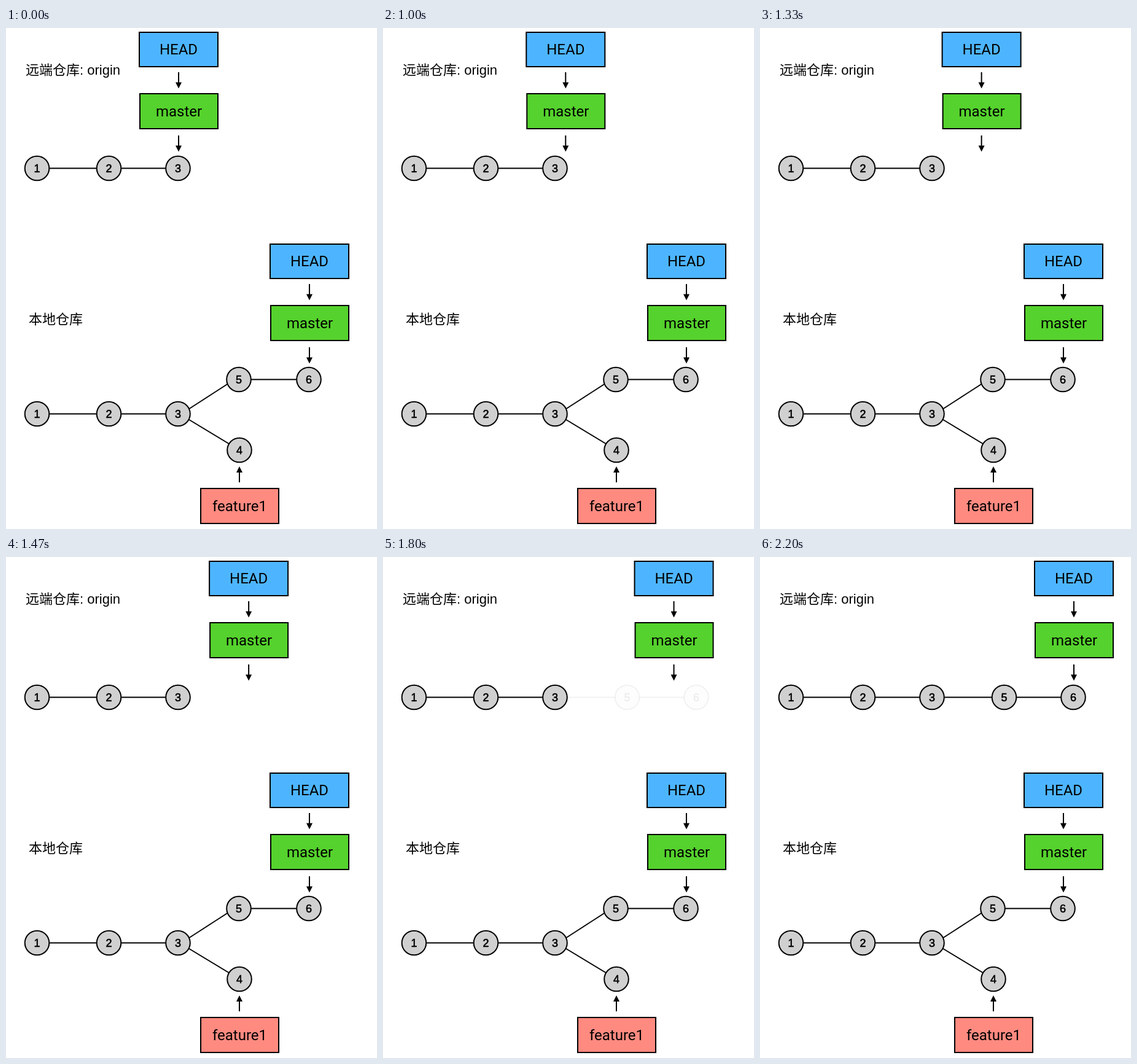
Animation of 604x816 px, one loop 3600 ms. Source, as an HTML page with a canvas:

```html
<!DOCTYPE html>
<html lang="zh-CN">
<head>
<meta charset="utf-8">
<title>Push</title>
<style>
html, body { margin: 0; width: 100%; height: 100%; overflow: hidden; background: #fff; }
canvas { display: block; width: 604px; height: 816px; }
</style>
</head>
<body>
<canvas id="stage" width="604" height="816"></canvas>
<script>
const ctx = document.getElementById('stage').getContext('2d');
const LOOP = 3600;
const TICK = 1000 / 15;
const BLUE = '#4db5ff', GREEN = '#55d22d', RED = '#ff8a80', GRAY = '#d0d0d0';
const LABEL = '24px Roboto, sans-serif';
const TITLE = '22px "Liberation Sans", "Noto Sans CJK SC", "Noto Sans CJK", sans-serif';
const DIGIT = '18px "Liberation Sans", Arial, sans-serif';

// Ease-in-out as cubic-bezier(.42, 0, .58, 1), solved by bisection
function ease(u) {
  if (u <= 0) return 0;
  if (u >= 1) return 1;
  let lo = 0, hi = 1;
  for (let i = 0; i < 24; i++) {
    const s = (lo + hi) / 2, r = 1 - s;
    const x = 3 * r * r * s * 0.42 + 3 * r * s * s * 0.58 + s * s * s;
    if (x < u) lo = s; else hi = s;
  }
  return lo * lo * (3 - 2 * lo);
}

function line(x1, y1, x2, y2) {
  ctx.beginPath();
  ctx.moveTo(x1, y1);
  ctx.lineTo(x2, y2);
  ctx.stroke();
}

function text(str, x, y, font, align = 'center') {
  ctx.font = font;
  ctx.textAlign = align;
  ctx.fillStyle = '#000';
  ctx.fillText(str, x, y);
}

function box(str, x, y, w, h, color) {
  ctx.fillStyle = color;
  ctx.fillRect(x, y, w, h);
  ctx.strokeRect(x, y, w, h);
  text(str, x + w / 2, y + h / 2 + 8.3, LABEL);
}

function arrow(x, from, to) {
  const d = Math.sign(to - from);
  line(x, from, x, to - 8 * d);
  ctx.fillStyle = '#000';
  ctx.beginPath();
  ctx.moveTo(x, to);
  ctx.lineTo(x - 5, to - 10 * d);
  ctx.lineTo(x + 5, to - 10 * d);
  ctx.fill();
}

function node(n, x, y) {
  ctx.beginPath();
  ctx.arc(x, y, 19.8, 0, Math.PI * 2);
  ctx.fillStyle = GRAY;
  ctx.fill();
  ctx.stroke();
  text(n, x, y + 6.5, DIGIT);
  ctx.lineWidth = 0.6;
  ctx.strokeText(n, x, y + 6.5);
  ctx.lineWidth = 2;
}

function pointer(x, y) {
  ctx.save();
  ctx.translate(x, y);
  box('HEAD', 217, 7, 128, 56, BLUE);
  arrow(281, 72, 98.5);
  box('master', 218, 107, 127, 57, GREEN);
  arrow(281, 175, 201.5);
  ctx.restore();
}

function trunk(y) {
  line(50.5, y, 280, y);
  node('1', 50.5, y);
  node('2', 167.5, y);
  node('3', 280, y);
}

function remote(shift, alpha) {
  text('远端仓库: origin', 32, 75.5, TITLE, 'left');
  trunk(228.5);
  ctx.globalAlpha = alpha;
  line(300.5, 228.5, 378, 228.5);
  line(417.5, 228.5, 490, 228.5);
  node('5', 397.5, 228.5);
  node('6', 510, 228.5);
  ctx.globalAlpha = 1;
  pointer(shift, 0);
}

function local() {
  text('本地仓库', 37, 481.5, TITLE, 'left');
  line(280, 632, 379, 568);
  line(280, 627, 380, 687.5);
  line(379, 572.5, 493, 572.5);
  trunk(628.5);
  node('5', 379, 572.5);
  node('6', 493, 572.5);
  node('4', 380, 687.5);
  pointer(213, 345);
  arrow(380, 740, 714);
  box('feature1', 317, 750, 127, 57, RED);
}

function draw(now) {
  const t = Math.floor((now % LOOP + 4) / TICK) * TICK;
  const done = t > 2190;
  ctx.fillStyle = '#fff';
  ctx.fillRect(0, 0, 604, 816);
  ctx.strokeStyle = '#000';
  ctx.lineWidth = 2;
  remote(done ? 230 : 230 * ease((t - 720) / 1500),
         done ? 1 : ease((t - 1720) / 500));
  local();
}

const start = performance.now();
function loop() {
  draw(performance.now() - start);
  requestAnimationFrame(loop);
}
loop();
</script>
</body>
</html>
```
